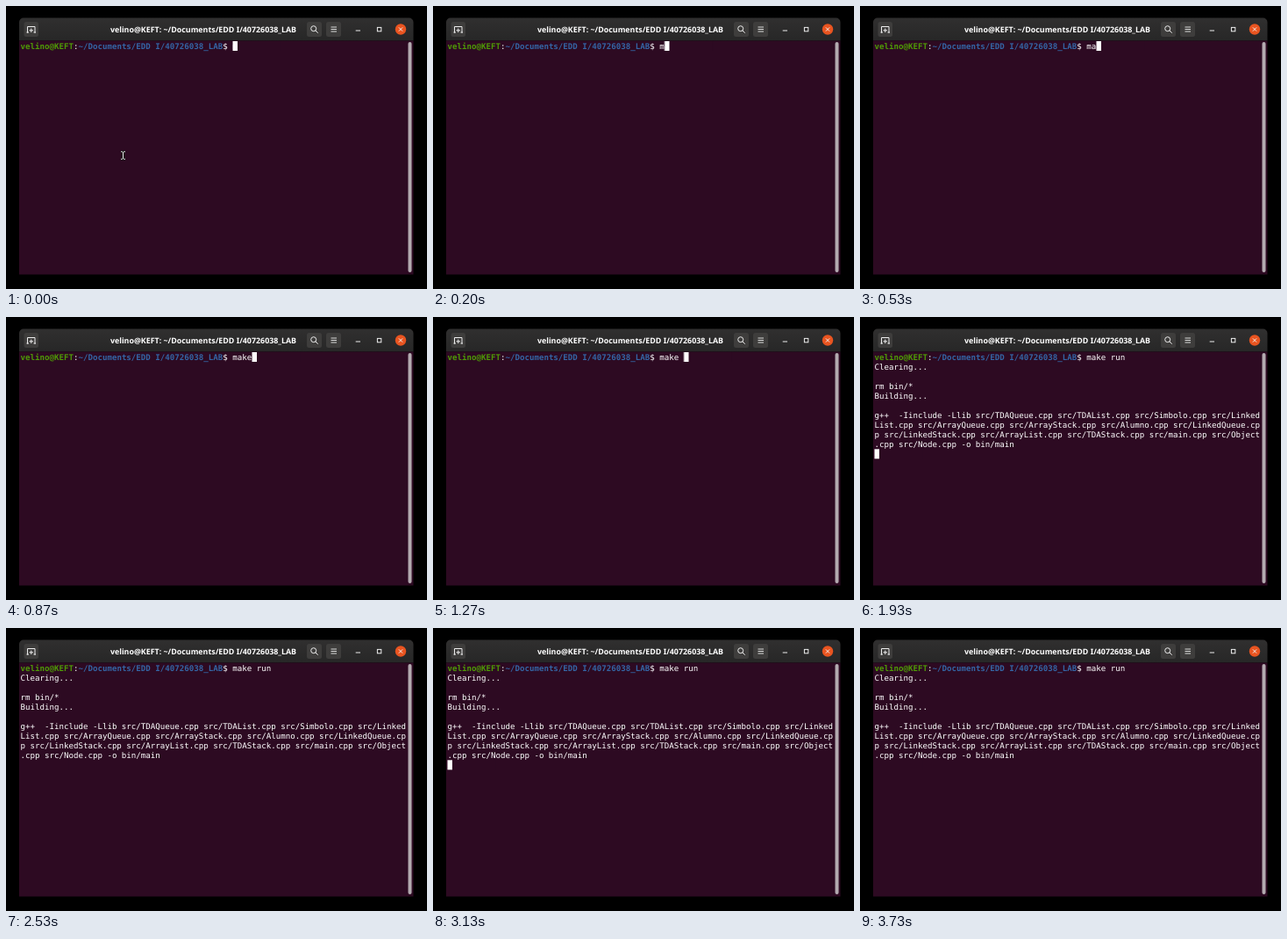
These frames come from a looping animation (480 px wide and 322 px high, 3.99 s). An HTML page:

```html
<!DOCTYPE html>
<html lang="es">
<head>
<meta charset="utf-8">
<title>Terminal</title>
<style>
  html, body { margin: 0; width: 100%; height: 100%; overflow: hidden; background: #000; }
  svg { display: block; width: 480px; height: 322px; }
  text { white-space: pre; text-rendering: geometricPrecision; }
  .title { font: bold 8.87px "Noto Sans", "Open Sans", sans-serif; text-anchor: middle; fill: #fff; }
  .term { font: 9.135px "DejaVu Sans Mono", monospace; fill: #fff; }
  .user { font-weight: bold; fill: #4e9a06; }
  .path { font-weight: bold; fill: #3465a4; }
  .button { fill: #3e3d3c; }
  .icon { fill: none; stroke: #eee; stroke-width: 1; }

  #pointer, #output, #caret, #block { animation: 3990ms step-end infinite; }
  #pointer { animation-name: hide-pointer; }
  #output { animation-name: show-output; }
  #caret { animation-name: type; }
  #block { animation-name: blink; }

  @keyframes hide-pointer {
    0% { visibility: visible; }
    1.754%, 100% { visibility: hidden; }
  }
  @keyframes show-output {
    0% { visibility: hidden; }
    48.37%, 100% { visibility: visible; }
  }
  /* The caret drags a background patch that hides letters not yet typed. */
  @keyframes type {
    0% { transform: translate(0, 0); }
    3.258% { transform: translate(5.5px, 0); }
    13.28% { transform: translate(11px, 0); }
    18.295% { transform: translate(16.5px, 0); }
    21.8% { transform: translate(22px, 0); }
    31.825% { transform: translate(27.5px, 0); }
    36.84% { transform: translate(33px, 0); }
    38.34% { transform: translate(38.5px, 0); }
    40.1% { transform: translate(44px, 0); }
    48.37%, 100% { transform: translate(-242px, 110.3px); }
  }
  @keyframes blink {
    0% { visibility: visible; }
    63.405% { visibility: hidden; }
    78.445% { visibility: visible; }
    93.48%, 100% { visibility: hidden; }
  }
</style>
</head>
<body>
<svg viewBox="0 0 480 322">
  <defs>
    <linearGradient id="bar" x2="0" y2="1">
      <stop stop-color="#302f2f"/>
      <stop offset="1" stop-color="#272727"/>
    </linearGradient>
  </defs>

  <path d="M15 39.5V18.5a5 5 0 0 1 5-5H459.500a5 5 0 0 1 5 5V39.500z" fill="url(#bar)"/>
  <rect x="15" y="39.500" width="449.500" height="266" fill="#2d0a22"/>
  <rect x="458.500" y="41" width="4" height="262" rx="2" fill="#b3aab0"/>

  <g class="button">
    <rect x="20.500" y="18" width="16.500" height="17" rx="2.500"/>
    <rect x="343" y="18" width="17" height="17" rx="2.500"/>
    <rect x="365" y="18" width="17" height="17" rx="2.500"/>
  </g>
  <g class="icon">
    <path d="M24.500 30.500V23.500H33V30.500M23.500 30H26M31.500 30H34M28.750 25.500V30M26.500 27.750H31"/>
    <circle cx="350.700" cy="25.700" r="3"/>
    <path d="M353 28l2.700 2.700"/>
    <path d="M370.500 24H377M370.500 26.500H377M370.500 29H377" stroke-width=".9"/>
    <path d="M398.700 28H404"/>
    <rect x="423.400" y="24.400" width="4.400" height="4.400"/>
  </g>
  <circle cx="450" cy="26.500" r="6.200" fill="#e95420"/>
  <path class="icon" d="M447.900 24.400l4.200 4.200m0-4.200l-4.200 4.200"/>
  <text class="title" x="225" y="29.600">velino@KEFT: ~/Documents/EDD I/40726038_LAB</text>

  <g class="term">
    <text x="16.500" y="48.700"><tspan class="user">velino@KEFT</tspan>:<tspan class="path">~/Documents/EDD I/40726038_LAB</tspan>$ make run</text>
    <g id="output">
      <text x="16.500" y="59.700">Clearing...</text>
      <text x="16.500" y="81.800">rm bin/*</text>
      <text x="16.500" y="92.800">Building...</text>
      <text x="16.500" y="114.900">g++  -Iinclude -Llib src/TDAQueue.cpp src/TDAList.cpp src/Simbolo.cpp src/Linked</text>
      <text x="16.500" y="125.900">List.cpp src/ArrayQueue.cpp src/ArrayStack.cpp src/Alumno.cpp src/LinkedQueue.cp</text>
      <text x="16.500" y="136.900">p src/LinkedStack.cpp src/ArrayList.cpp src/TDAStack.cpp src/main.cpp src/Object</text>
      <text x="16.500" y="148">.cpp src/Node.cpp -o bin/main</text>
    </g>
  </g>

  <g id="caret">
    <rect x="258.500" y="40" width="55" height="11" fill="#2d0a22"/>
    <rect id="block" x="258.500" y="40" width="5.500" height="11" fill="#fff"/>
  </g>

  <g id="pointer" fill="none">
    <path id="beam" d="M131 165.800H132.500L133.500 166.500L134.500 165.800H136M133.500 166.500V173.500M131 174.200H132.500L133.500 173.500L134.500 174.200H136" stroke="#111" stroke-width="2.400"/>
    <use href="#beam" style="display:none"/>
    <path d="M131 165.800H132.500L133.500 166.500L134.500 165.800H136M133.500 166.500V173.500M131 174.200H132.500L133.500 173.500L134.500 174.200H136" stroke="#eee"/>
  </g>
</svg>
</body>
</html>
```
